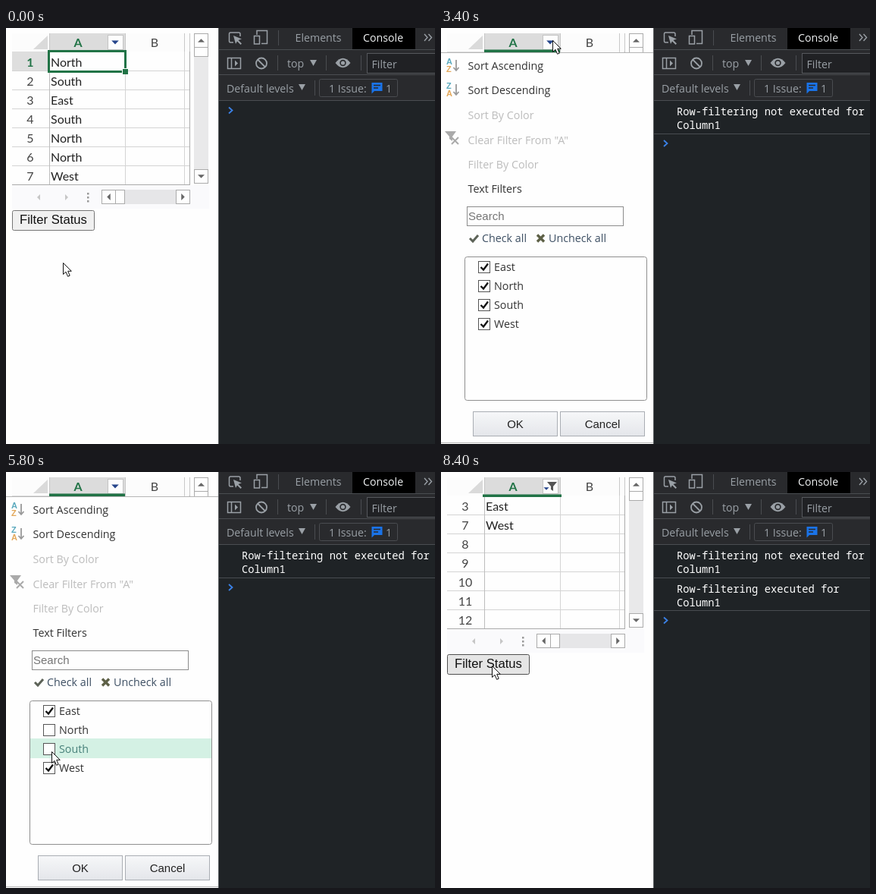
Write an HTML page that moves like this. It is 566 by 548 pixels and loops after 8600 ms.

```html
<!DOCTYPE html>
<html lang="en">
<head>
<meta charset="utf-8">
<title>Filter status</title>
<style>
html, body { margin: 0; width: 100%; height: 100%; overflow: hidden; background: #fefefe; }
svg { display: block; width: 566px; height: 548px; }
text { white-space: pre; }
.cell { font: 16px Lato, sans-serif; fill: #222; }
.head { font: 16px Lato, sans-serif; fill: #444; text-anchor: middle; }
.on { font-weight: 700; fill: #217346; }
.menu { font: 14.3px "Open Sans", sans-serif; fill: #333; }
.off { fill: #bcbcbc; }
.link { fill: #3d4f63; }
.form { font: 15px "Liberation Sans", Arial, sans-serif; fill: #222; }
.dev { font: 14.2px "Open Sans", sans-serif; fill: #9aa0a6; }
.log { font: 500 13.78px "Noto Sans Mono", monospace; fill: #fff; }
</style>
</head>
<body>
<svg id="stage" viewBox="0 0 566 548" xmlns="http://www.w3.org/2000/svg"></svg>
<script>
const LOOP = 8600, STEP = 200;
const GREEN = '#217346', GRID = '#d4d4d4', ICON = '#9aa0a6';

const rect = (x, y, w, h, fill, more = '') =>
  `<rect x="${x}" y="${y}" width="${w}" height="${h}" fill="${fill}" ${more}/>`;
const box = (x, y, w, h, fill, stroke, r = 0) =>
  rect(x + .5, y + .5, w - 1, h - 1, fill, `stroke="${stroke}" rx="${r}"`);
const path = (d, fill, stroke = 'none', w = 1) =>
  `<path d="${d}" fill="${fill}" stroke="${stroke}" stroke-width="${w}"/>`;
const line = (d, color, w = 1) => path(d, 'none', color, w);
const text = (x, y, s, cls, more = '') =>
  `<text x="${x}" y="${y}" class="${cls}" ${more}>${s}</text>`;
const group = (id, body) => `<g id="${id}">${body}</g>`;

// Triangle centred on x, y; dir is one of up, down, left, right.
function tri(x, y, r, dir, fill, h = r) {
  const turn = { up: 0, right: 90, down: 180, left: 270 }[dir];
  return `<path transform="translate(${x} ${y}) rotate(${turn})" d="M${-r} ${h / 2}L0 ${-h / 2}L${r} ${h / 2}Z" fill="${fill}"/>`;
}

function scrollBars() {
  const btn = (x, y, dir) => box(x, y, 19, 19, '#fefefe', '#ababab') + tri(x + 9.5, y + 9.5, 4.5, dir, '#666');
  return rect(8, 207, 260, 31, '#fafafc') +
    rect(248, 7, 19, 198, '#e9e9ea') + btn(248, 7, 'up') + btn(248, 186, 'down') +
    box(248, 25, 19, 13, '#fefefe', '#ababab') +
    rect(126, 213, 117, 19, '#e6e6e8') + btn(126, 213, 'left') + btn(224, 213, 'right') +
    box(144, 213, 13, 19, '#fefefe', '#ababab') +
    tri(43, 223, 4, 'left', '#c6c6c6') + tri(80, 223, 4, 'right', '#c6c6c6') +
    [217, 222, 227].map(y => rect(107, y, 2.5, 2.5, '#999')).join('');
}

function header() {
  return rect(8, 7, 235, 24, '#fcfcfc') + rect(57, 7, 100, 24, '#dcdcdc') +
    path('M36 28H55V10Z', '#dadada') +
    line('M57.5 7V31M157.5 7V31M235.5 7V31M242.5 7V31', '#c8c8c8') +
    text(95, 25, 'A', 'head on') + text(196, 25, 'B', 'head') +
    box(134, 9, 21, 20, '#fdfdfd', '#c3c3c3') +
    group('arrow', tri(144, 19, 4.8, 'down', '#27468b')) +
    group('funnel', path('M140 13H153L148 19V25L145 23V19Z', '#555') + tri(139, 22, 3.5, 'down', '#27468b'));
}

// numbers: row labels, values: texts in column A
function rows(numbers, values, active) {
  return numbers.map((n, i) => {
    const y = 31 + i * 25;
    return (active && !i ? rect(8, y, 49, 25, '#dedede') : '') +
      line(`M8 ${y + 25.5}H243`, GRID) +
      text(32, y + 20, n, active && !i ? 'head on' : 'head') +
      text(59, y + 20, values[i] || '', 'cell');
  }).join('');
}

function sheet() {
  const all = ['North', 'South', 'East', 'South', 'North', 'North', 'West'];
  const select = rect(56.5, 30.5, 101, 27, 'none', `stroke="${GREEN}" stroke-width="3"`) +
    rect(153, 53, 8, 8, '#fefefe') + rect(154, 54, 7, 7, GREEN);
  return group('all', rows([1, 2, 3, 4, 5, 6, 7], all, true)) +
    group('some', rows([3, 7, 8, 9, 10, 11, 12], ['East', 'West'])) +
    line('M57.5 31V206M157.5 31V206M235.5 31V206', GRID) +
    line('M57.5 31V206', '#bdbdbd') + line('M8 206.5H243M242.5 31V206', '#ababab') +
    header() + group('select', select) + group('rule', rect(55, 29.5, 104, 3.5, GREEN));
}

function sortIcon(y, top, bottom) {
  const letter = (dy, s, c) => text(7, y + dy, s, 'form', `style="font-size:11px;font-weight:700;fill:${c}"`);
  return letter(-1, top, '#5aa9bd') + letter(9, bottom, '#e3a85a') +
    line(`M20 ${y - 7}V${y + 6}M16.5 ${y + 3}L20 ${y + 7}L23.5 ${y + 3}`, '#999', 1.8);
}

function menu() {
  const item = (y, s, cls = '') => text(35.5, y + 5, s, 'menu ' + cls);
  const check = (i, s) => {
    const y = 307 + i * 25;
    return box(49, y, 16, 16, '#fefefe', '#555') +
      group('tick' + s, line(`M52.5 ${y + 8}L56 ${y + 11.5}L62 ${y + 3.5}`, '#111', 2.4)) +
      text(70, y + 13, s, 'menu', `id="label${s}"`);
  };
  const button = (x, s) => box(x, 505, 112, 33, 'url(#face)', '#a9adb3') +
    text(x + 56, 527, s, 'form', 'text-anchor="middle"');
  return rect(0, 32, 280, 516, '#fefefe') + line('M0 32.5H280M0 546.5H280', '#b5b5b5') +
    rect(57, 28.5, 100, 3.5, GREEN) +
    sortIcon(49, 'A', 'Z') + sortIcon(81, 'Z', 'A') +
    item(50, 'Sort Ascending') + item(82, 'Sort Descending') + item(115, 'Sort By Color', 'off') +
    item(148, 'Clear Filter From "A"', 'off') + item(180, 'Filter By Color', 'off') + item(212, 'Text Filters') +
    path('M5 136H20L15 143V149L11 146V143Z', '#aaa') + line('M14 144L23 153M23 144L14 153', '#aaa', 2) +
    box(34, 235, 207, 26, '#fefefe', '#8c8c8c') + text(36, 253, 'Search', 'form', 'style="fill:#757575"') +
    line('M38 277L42 281L49 273', '#5d6358', 3) + text(54, 282, 'Check all', 'menu link') +
    line('M127 272.5L136 281.5M136 272.5L127 281.5', '#5d6046', 3.4) + text(142, 282, 'Uncheck all', 'menu link') +
    box(31, 301, 241, 190, '#fefefe', '#8f8f8f', 3) +
    group('mark', rect(32, 351, 239, 26, '#d4f1e4')) +
    ['East', 'North', 'South', 'West'].map((s, i) => check(i, s)).join('') +
    button(42, 'OK') + button(157, 'Cancel');
}

function toolbar() {
  const bar = (x, y) => line(`M${x}.5 ${y - 10}V${y + 10}`, '#4a4c50');
  return rect(280, 0, 286, 548, '#1f2326') + rect(281, 0, 285, 96, '#292a2d') +
    rect(280, 0, 1, 548, '#5a5d60') + rect(457, 0, 83, 28, '#000') +
    line('M281 28.5H566M281 61.5H566M281 95.5H566', '#4a4d51') +
    // inspect and device buttons
    line('M300 19H296Q294.5 19 294.5 17V8Q294.5 6 296 6H307Q309 6 309 8V11', ICON, 1.5) +
    path('M300 10L311 14.5L306.5 16L311 20.5L309.5 22L305 17.5L303 21Z', ICON) +
    line('M331 9V3.5H344.5V20.5H337M327.5 10.5H334.5V21H327.5Z', ICON, 1.5) +
    bar(359, 13) + text(381.5, 18, 'Elements', 'dev') +
    text(471, 18, 'Console', 'dev', 'style="fill:#f1f3f4"') +
    line('M552 8L556 12.5L552 17M557.5 8L561.5 12.5L557.5 17', ICON, 1.4) +
    // second row
    line('M292.5 39.5H309.5V53.5H292.5ZM297.5 39.5V53.5', ICON, 1.5) + tri(304, 46.5, 4, 'right', ICON) +
    `<circle cx="337" cy="46.5" r="7" fill="none" stroke="${ICON}" stroke-width="1.8"/>` +
    line('M332 41.5L342 51.5', ICON, 1.8) + bar(358, 46) +
    text(371, 52, 'top', 'dev') + tri(405.5, 46, 4.5, 'down', ICON, 8) + bar(422, 46) +
    path('M434.5 46Q444.5 33.5 454.5 46Q444.5 58.5 434.5 46Z', ICON) +
    '<circle cx="444.5" cy="46" r="3.4" fill="#9aa0a6" stroke="#292a2d" stroke-width="1.6"/>' +
    bar(468, 46) + box(476, 33, 100, 27, '#202124', '#55585c') + text(482.5, 53, 'Filter', 'dev') +
    // third row
    text(291, 85, 'Default levels', 'dev') + tri(390.5, 78, 4.5, 'down', ICON, 8) + bar(407, 79) +
    box(413, 67, 104, 24, 'none', '#4a4c50', 2) + text(426, 85, '1 Issue:', 'dev') +
    path('M482.5 72H496.5V83H486L482.5 86.5Z', '#1a73e8') +
    line('M485 75.5H494M485 79H491', '#292a2d', 1.4) + text(501, 85, '1', 'dev');
}

function log() {
  return group('log1', text(311, 115, 'Row-filtering not executed for', 'log') +
      text(311, 133, 'Column1', 'log') + line('M281 139.5H566', '#484c50')) +
    group('log2', text(311, 159, 'Row-filtering executed for', 'log') +
      text(311, 177, 'Column1', 'log') + line('M281 182.5H566', '#484c50')) +
    group('prompt', line('M294 -4L298.5 0L294 4', '#3b82e8', 1.8));
}

const stage = document.getElementById('stage');
stage.innerHTML =
  '<defs><linearGradient id="face" x2="0" y2="1"><stop stop-color="#f6f7f9"/><stop offset="1" stop-color="#e4e6ea"/></linearGradient></defs>' +
  rect(0, 0, 566, 548, '#fefefe') + scrollBars() + sheet() +
  '<rect id="button" x="8.5" y="240.5" width="108" height="26" rx="2"/>' +
  text(18, 258, 'Filter Status', 'form', 'style="font-size:16.67px;fill:#111"') +
  group('menu', menu()) + toolbar() + log() +
  group('cursor',
    group('pointer', path('M.5 .5V15.5L4 12.3L6.6 18.3L9.2 17.2L6.7 11.3H11.3Z', '#fff', '#111')) +
    group('hand', path('M-1.5 11V1.2Q0 -.8 1.5 1.2V7Q3.2 5.6 4.4 7.4Q6.2 6.2 7.2 8Q9.6 7.4 9.6 10V13Q9.6 15 7.8 17.5V20H-1.2V17.5L-6 11.5Q-6.4 8.6 -3.8 9.4Z', '#fff', '#111') +
      line('M1.5 7V11M4.4 8V11M7.2 9V11', '#111')));

const el = {};
stage.querySelectorAll('[id]').forEach(n => { el[n.id] = n; });

const show = (id, on) => el[id].setAttribute('display', on ? 'inline' : 'none');
const move = (id, x, y) => el[id].setAttribute('transform', `translate(${x} ${y})`);

// Pointer stops: time, x, y
const stops = [
  [0, 75, 309], [600, 67, 256], [2000, 67, 256], [2400, 149, 48], [2800, 147, 16],
  [4400, 147, 16], [5000, 60, 340], [5400, 60, 340], [5600, 60, 368], [6000, 60, 368],
  [6600, 101, 531], [6800, 101, 531], [7600, 67, 279], [8000, 67, 255], [LOOP, 67, 255]
];

function pointer(t) {
  const i = stops.findIndex(s => s[0] > t);
  const [t0, x0, y0] = stops[i - 1], [t1, x1, y1] = stops[i];
  const p = (t - t0) / (t1 - t0), k = p * p * (3 - 2 * p);
  return [Math.round(x0 + (x1 - x0) * k), Math.round(y0 + (y1 - y0) * k)];
}

function draw(time) {
  const t = Math.floor((time % LOOP) / STEP) * STEP;
  const within = (a, b) => t >= a && t < b;
  const open = within(3400, 6800), filtered = t >= 6800;
  const [x, y] = pointer(t);

  show('menu', open);
  show('all', !filtered);
  show('some', filtered);
  show('select', !filtered && !open);
  show('rule', filtered);
  show('arrow', !filtered);
  show('funnel', filtered);

  show('tickNorth', t < 5200);
  show('tickSouth', t < 5800);
  show('mark', t >= 5800);
  el.labelSouth.style.fill = t >= 5800 ? '#47807a' : '';

  const hover = within(600, 2200) || t >= 8000;
  const press = t === 1000 || t === 8200;
  el.button.setAttribute('fill', press ? '#f5f5f5' : hover ? '#e5e5e5' : '#f0f0f0');
  el.button.setAttribute('stroke', press ? '#8d8d8d' : hover ? '#4f4f4f' : '#767676');

  const first = t >= 1200, second = t >= 8400;
  show('log1', first);
  show('log2', second);
  move('prompt', 0, second ? 195.5 : first ? 152 : 108.5);

  const hand = open && y > 500;
  show('hand', hand);
  show('pointer', !hand);
  move('cursor', x, y);
}

const start = performance.now();
function tick() {
  draw(performance.now() - start);
  requestAnimationFrame(tick);
}
tick();
</script>
</body>
</html>
```
